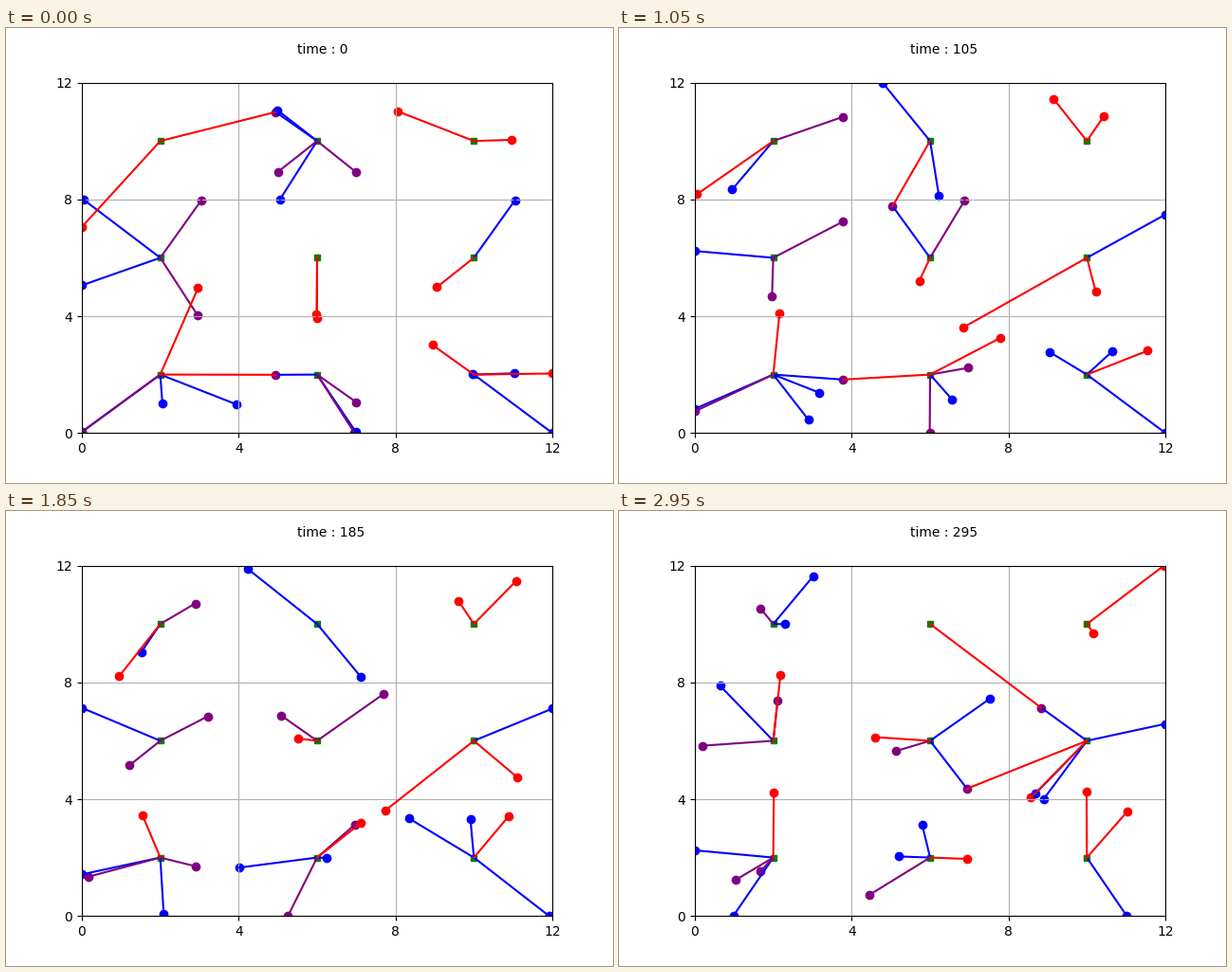
Write a matplotlib script that moves like this. It is 640x480 px and loops after 3000 ms.

```python
import numpy as np
import matplotlib.pyplot as plt
from matplotlib.animation import FuncAnimation

FRAMES = 60
STEP = 5
SIZE = 12
SPEED = 0.056
STATIONS = [(x, y) for x in (2, 6, 10) for y in (2, 6, 10)]

fig, ax = plt.subplots(figsize=(6.4, 4.8), dpi=100)
ticks = range(0, SIZE + 1, 4)
ax.set(xlim=(0, SIZE), ylim=(0, SIZE), xticks=ticks, yticks=ticks)
ax.grid(True)
ax.plot(*zip(*STATIONS), "s", color="green", ms=4, zorder=1)
label = ax.text(5.5, 13, "")


def latest(schedule, i):
    """Value of the last entry that has begun by step i."""
    begun = [t for t in schedule if t <= i]
    return schedule[max(begun)] if begun else None


def nearest(pos):
    return min(STATIONS, key=lambda s: np.hypot(*(pos - s)))


def connect(line, pos, station):
    line.set_data(*zip(pos, station))


class Walker:
    """Walks at one speed from a grid point, held inside the walls.

    turns maps a step to a heading in degrees. handovers maps a step to the
    station of the red link; without one it goes to the nearest station.
    """

    def __init__(self, color, start, turns, handovers=()):
        self.color = color
        self.handovers = handovers
        self.path = []
        pos = np.array(start, float)
        for i in range(FRAMES):
            a = np.radians(latest(turns, i))
            pos = np.clip(pos + SPEED * np.array([np.cos(a), np.sin(a)]), 0, SIZE)
            self.path.append(pos)
        self.dot, = ax.plot([], [], "o", color=color, zorder=1)
        self.blue_link, = ax.plot([], [], color="blue")
        self.red_link, = ax.plot([], [], color="red", zorder=2.1)

    def draw(self, i):
        pos = self.path[i]
        near = nearest(pos)
        chosen = latest(self.handovers, i) or near
        shared = self.color == "purple" and chosen == near
        self.dot.set_data(pos[:1], pos[1:])
        connect(self.blue_link, pos, near)
        connect(self.red_link, pos, chosen)
        self.blue_link.set_visible(self.color != "red" and not shared)
        self.red_link.set_visible(self.color != "blue")
        self.red_link.set_color("purple" if shared else "red")


walkers = [
    Walker("blue", (0, 0), {0: 138}),

    Walker("purple", (5, 11), {0: 188}, {0: (2, 10)}),
    Walker("purple", (5, 9), {0: 272}, {0: (6, 10), 32: None}),
    Walker("purple", (7, 9), {0: 251, 18: 337}, {44: (6, 10)}),
    Walker("purple", (3, 8), {0: 325, 19: 239, 33: 154}),
    Walker("purple", (3, 4), {0: 147}),
    Walker("purple", (0, 0), {0: 143, 33: 55, 46: 323}),
    Walker("purple", (5, 2), {0: 188}, {0: (2, 2), 17: (6, 2), 24: None}),
    Walker("purple", (7, 1), {0: 91}, {44: (10, 6)}),
    Walker("purple", (7, 0), {0: 215, 44: 126}),

    Walker("red", (0, 7), {0: 90, 21: 2}, {0: (2, 10), 55: (2, 6)}),
    Walker("red", (8, 11), {0: 21, 24: 297}),
    Walker("red", (11, 10), {0: 136, 18: 44}),
    Walker("red", (3, 5), {0: 227, 41: 57}, {0: (2, 2)}),
    Walker("red", (6, 4), {0: 103, 44: 198}),
    Walker("red", (6, 4), {0: 270, 7: 0, 52: 83}, {0: (6, 6), 6: (10, 6)}),
    Walker("red", (9, 5), {0: 353, 39: 263}),
    Walker("red", (9, 3), {0: 168, 34: 262}, {5: (6, 2)}),
    Walker("red", (12, 2), {0: 40, 11: 137}, {0: (10, 2)}),

    Walker("blue", (5, 11), {0: 100, 29: 192}),
    Walker("blue", (5, 8), {0: 5, 46: 267}),
    Walker("blue", (0, 8), {0: 341, 10: 51}),
    Walker("blue", (0, 5), {0: 90, 48: 17}),
    Walker("blue", (11, 8), {0: 335}),
    Walker("blue", (10, 2), {0: 141, 44: 47}),
    Walker("blue", (11, 2), {0: 50, 8: 145}),
    Walker("blue", (12, 0), {0: 315, 36: 223}),
    Walker("blue", (2, 1), {0: 18}),
    Walker("blue", (4, 1), {0: 206}),
    Walker("blue", (7, 0), {0: 111}),
]


def draw(i):
    label.set_text(f"time : {i * STEP}")
    for walker in walkers:
        walker.draw(i)
    return []


anim = FuncAnimation(fig, draw, frames=FRAMES, interval=50,
                     init_func=lambda: draw(0), repeat=True, repeat_delay=0)
plt.show()
```
